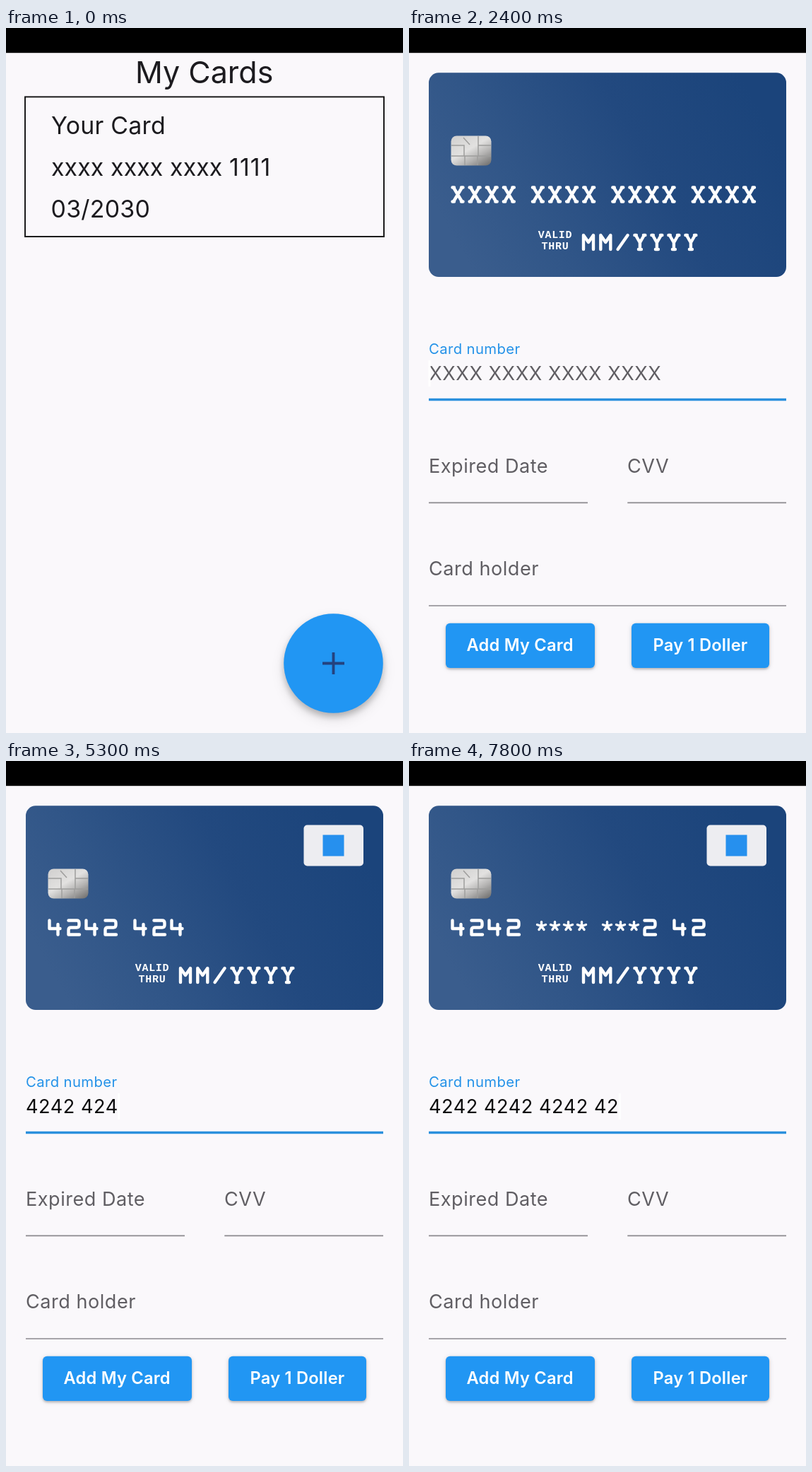
An HTML page that plays this animation: 562 by 997 pixels, repeating every 8 s.

```html
<!DOCTYPE html>
<html lang="en">
<head>
<meta charset="utf-8">
<title>Card form</title>
<style>
  html, body { margin: 0; width: 100%; height: 100%; overflow: hidden; background: #faf8fb; }
  svg { display: block; width: 562px; height: 997px; font-family: Inter, "Open Sans", sans-serif; }
  text { white-space: pre; }
  .label { font-size: 27.1px; letter-spacing: .5px; fill: #605e63; }
  .list { font-size: 33.9px; letter-spacing: .25px; fill: #1c1b1f; }
  .button { font-size: 23.7px; font-weight: 600; letter-spacing: .2px; fill: #fff; text-anchor: middle; }
  .rule { stroke: #8b898e; stroke-width: 1.7; }
  .valid { font: bold 15px "Liberation Mono", monospace; letter-spacing: .7px; fill: #fff; text-anchor: middle; }
  .emboss { fill: none; stroke: #fff; stroke-width: 4.4; stroke-linecap: round; stroke-linejoin: round; }
  .emboss .star { stroke-width: 3.4; }
  .fab { filter: drop-shadow(0 5px 4px #0003) drop-shadow(0 7px 8px #0002); }
  .raised { filter: drop-shadow(0 2.5px 1.5px #0003) drop-shadow(0 1px 3px #0002); }
</style>
</head>
<body>
<svg viewBox="0 0 562 997">
  <defs>
    <linearGradient id="face" gradientUnits="userSpaceOnUse" x1="534" y1="63" x2="28" y2="352">
      <stop offset=".1" stop-color="#1b447b"/>
      <stop offset=".4" stop-color="#22497f"/>
      <stop offset=".7" stop-color="#315688"/>
      <stop offset=".9" stop-color="#3a5d8d"/>
    </linearGradient>
    <linearGradient id="metal" x1=".1" y1="0" x2=".9" y2="1">
      <stop offset="0" stop-color="#d2d1d0"/>
      <stop offset=".45" stop-color="#e2e1e0"/>
      <stop offset=".7" stop-color="#b5b4b3"/>
      <stop offset="1" stop-color="#757473"/>
    </linearGradient>
  </defs>
  <rect width="562" height="997" fill="#faf8fb"/>
  <rect width="562" height="35.2" fill="#000"/>

  <g id="listPage">
    <text x="280.7" y="77.8" font-size="43" text-anchor="middle" fill="#1c1b1f">My Cards</text>
    <rect x="27" y="97.4" width="508" height="197.6" fill="none" stroke="#111" stroke-width="1.9"/>
    <text class="list" x="64" y="149.6">Your Card</text>
    <text class="list" x="64" y="209" style="letter-spacing:.1px">xxxx xxxx xxxx <tspan style="letter-spacing:1px">1111</tspan></text>
    <text class="list" x="63.5" y="268.2">03/2030</text>
    <circle class="fab" cx="463.5" cy="898.5" r="70.3" fill="#2196f3"/>
    <path d="M448 898.5H479M463.5 883V914" stroke="#24427f" stroke-width="3.8"/>
  </g>

  <g id="formPage">
    <rect x="28" y="63.3" width="506" height="288.7" rx="14" fill="url(#face)"/>
    <g id="chip">
      <rect x="59.5" y="152.5" width="57" height="42" rx="8" fill="url(#metal)"/>
      <path d="M60 166H78V181H60M116 166H98V181H116M79 181V194M97 181V194M98 166V153M78 181H98M77 155L86 165"
        fill="none" stroke="#9f9e9d" stroke-width="1.5"/>
    </g>
    <g id="brand">
      <rect x="421.5" y="90.5" width="84.5" height="58" rx="5" fill="#ededf1"/>
      <rect x="448.5" y="104.5" width="30" height="30" fill="#2690ee"/>
    </g>
    <g id="cardNumber" class="emboss" role="img"></g>
    <text class="valid" x="207" y="297.4">VALID</text>
    <text class="valid" x="207" y="312.8">THRU</text>
    <g id="cardDate" class="emboss" role="img"></g>

    <path class="rule" id="numberRule" d="M28 525.5H534"/>
    <path class="rule" d="M28 671.3H253M309.3 671.3H534M28 817H534"/>
    <text class="label" id="numberLabel" x="0" y="0">Card number</text>
    <text class="label" x="28" y="628.6">Expired Date</text>
    <text class="label" x="309" y="628.6">CVV</text>
    <text class="label" x="28" y="774.3">Card holder</text>
    <text id="hint" x="28.3" y="497.8" font-size="27.1" letter-spacing=".55" fill="#605e63">XXXX XXXX XXXX XXXX</text>
    <rect id="cursor" y="470" width="3" height="37" fill="#fff"/>
    <text id="entry" x="28" y="497.8" font-size="27.1" letter-spacing=".55" fill="#0c0c0d"></text>

    <rect class="raised" x="52" y="841.8" width="211" height="63.2" rx="6" fill="#2196f3"/>
    <rect class="raised" x="315" y="841.8" width="195" height="63.2" rx="6" fill="#2196f3"/>
    <text class="button" x="157.2" y="881.3">Add My Card</text>
    <text class="button" x="412.5" y="881.3">Pay 1 Doller</text>
  </g>
</svg>
<script>
  const LOOP = 8000, STEP = 100, FORM_AT = 100, FOCUS_AT = 1200;
  const NUMBER = '4242 4242 4242 4242';
  // One entry per typed digit
  const KEYS = [3000, 3400, 3800, 4100, 4400, 4700, 5100, 5600, 6100, 6300, 6600, 7000, 7400, 7800];

  // Embossed lettering: [advance, stroke path]
  const GLYPHS = {
    X: [24.1, 'M2.5 2.5H5M15 2.5H17.5M4 2.5L16 22.5M16 2.5L4 22.5M2.5 22.5H5M15 22.5H17.5'],
    Y: [24, 'M2.5 2.5H5M15 2.5H17.5M4 2.5L10 13L16 2.5M10 13V22.5M8 22.5H12'],
    M: [24.3, 'M3 22.5V2.5L10 12.5L17 2.5V22.5'],
    '/': [24.3, 'M3 22.5L17 2.5'],
    4: [26, 'M2.5 2.5V14H17.5M14.5 8V22.5'],
    2: [26, 'M3.5 2.5H15Q18.5 2.5 18.5 6V9Q18.5 12.5 15 12.5H7Q3.5 12.5 3.5 16V22.5H19'],
    '*': [19, 'M7.5 10.5V4.5M7.5 10.5L13.5 8.5M7.5 10.5L11 15.5M7.5 10.5L4 15.5M7.5 10.5L1.5 8.5'],
    ' ': [17, '']
  };

  const $ = id => document.getElementById(id);
  const show = (id, on) => $(id).setAttribute('visibility', on ? 'inherit' : 'hidden');

  function emboss(id, str, x, y) {
    const g = $(id);
    if (g.getAttribute('aria-label') === str) return;
    g.setAttribute('aria-label', str);
    g.innerHTML = [...str].map(ch => {
      const [advance, d] = GLYPHS[ch];
      const path = `<path class="${ch === '*' ? 'star' : ''}" transform="translate(${x} ${y})" d="${d}"/>`;
      x += advance;
      return path;
    }).join('');
  }

  const clamp = x => Math.min(1, Math.max(0, x));
  const smooth = x => {
    x = clamp(x);
    return x * x * (3 - 2 * x);
  };

  const typed = count => NUMBER.slice(0, count + Math.floor(Math.max(0, count - 1) / 4));
  const mask = str => [...str].map((ch, i) =>
    ch !== ' ' && i > 3 && i < str.length - 4 ? '*' : ch).join('');

  function draw(now) {
    const t = Math.floor(now % LOOP / STEP) * STEP;
    const onForm = t >= FORM_AT;
    show('listPage', !onForm);
    show('formPage', onForm);

    const count = KEYS.filter(k => k <= t).length;
    const str = typed(count);
    show('brand', onForm && count > 0);
    emboss('cardNumber', count ? mask(str) : 'XXXX XXXX XXXX XXXX', 59, 223);
    $('entry').textContent = str;

    const focused = t >= FOCUS_AT;
    const p = smooth((t - FOCUS_AT + 20) / 320);
    const label = $('numberLabel');
    label.setAttribute('transform', `translate(28 ${482.9 - 21.9 * p}) scale(${1 - .25 * p})`);
    label.style.fill = focused ? '#2492e8' : '';
    $('numberRule').style.stroke = focused ? '#2b90dd' : '';
    $('numberRule').style.strokeWidth = 1.7 + 1.8 * p;

    const fade = clamp((t - KEYS[0]) / 200);
    $('hint').setAttribute('opacity', clamp(p / .75) * (1 - fade));

    const since = t - (count ? KEYS[count - 1] : FOCUS_AT);
    show('cursor', onForm && focused && since % 1000 < 500);
    $('cursor').setAttribute('x', 27.5 + (str ? $('entry').getComputedTextLength() : 0));
  }

  emboss('cardDate', 'MM/YYYY', 244, 290.5);
  const start = performance.now();
  function tick() {
    draw(performance.now() - start);
    requestAnimationFrame(tick);
  }
  tick();
</script>
</body>
</html>
```
